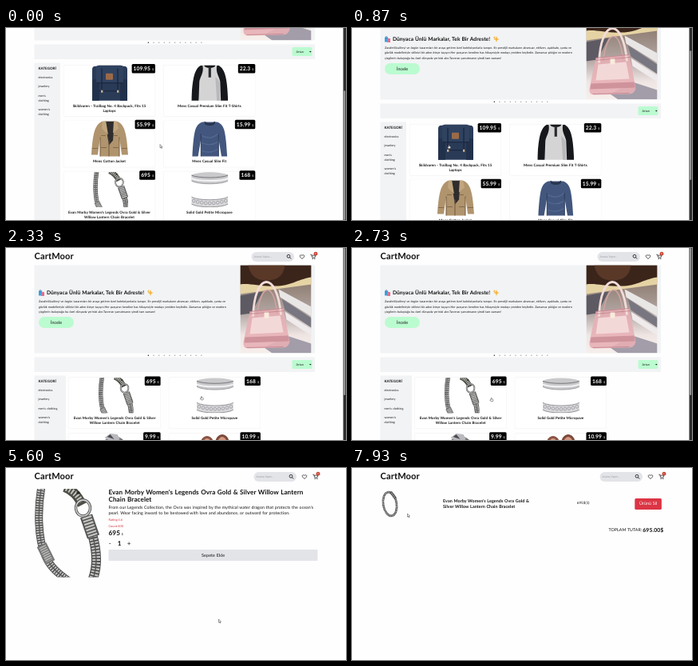
Write an HTML page with a canvas that moves like this. It is 426 px wide and 240 px high and loops after 8000 ms.

```html
<!DOCTYPE html>
<html lang="tr">
<head>
<meta charset="utf-8">
<title>CartMoor</title>
<style>
html, body { margin: 0; width: 100%; height: 100%; overflow: hidden; background: #fefefe; }
canvas { display: block; width: 100vw; height: 100vh; }
</style>
</head>
<body>
<canvas id="stage"></canvas>
<script>
const W = 426, H = 240, LOOP = 8000, STEP = 1000 / 15;
const canvas = document.getElementById('stage');
const ctx = canvas.getContext('2d');
const INK = '#111', PANEL = '#f2f3f5', MINT = '#bbfbd0', GREY = '#e3e4e8';

// Times of the clicks and page loads, in ms.
const PICK = 1460, LISTED = 1900, OPEN = 3030, OPENED = 3190, PLUS = 4800, ADD = 6600, CART = 7100;

const SHOP = 'CartMoor';
const BRACELET = "Evan Morby Women's Legends Ovra Gold &";

// ---------- helpers ----------
function rect(x, y, w, h, fill, r = 0) {
  ctx.fillStyle = fill;
  ctx.beginPath();
  ctx.roundRect(x, y, w, h, r);
  ctx.fill();
}

function setFont(size, bold) {
  ctx.font = `${bold ? 700 : 400} ${size}px Lato, "Open Sans", sans-serif`;
  ctx.textRendering = 'geometricPrecision';
  ctx.letterSpacing = `${size * 0.01}px`;
  ctx.wordSpacing = `${size * 0.05}px`;
}

function text(str, x, y, size, { bold = false, color = INK, align = 'left' } = {}) {
  setFont(size, bold);
  ctx.textAlign = align;
  ctx.fillStyle = color;
  ctx.fillText(str, x, y);
}

function poly(fill, ...p) {
  ctx.fillStyle = fill;
  ctx.beginPath();
  for (let i = 0; i < p.length; i += 2) ctx.lineTo(p[i], p[i + 1]);
  ctx.closePath();
  ctx.fill();
}

function blob(d, fill) {
  ctx.fillStyle = fill;
  ctx.fill(new Path2D(d));
}

function line(d, color, width, dash = []) {
  ctx.strokeStyle = color;
  ctx.lineWidth = width;
  ctx.setLineDash(dash);
  ctx.stroke(new Path2D(d));
  ctx.setLineDash([]);
}

function oval(x, y, rx, ry, color, width) {
  ctx.beginPath();
  ctx.ellipse(x, y, rx, ry, 0, 0, Math.PI * 2);
  if (width) {
    ctx.strokeStyle = color;
    ctx.lineWidth = width;
    ctx.stroke();
  } else {
    ctx.fillStyle = color;
    ctx.fill();
  }
}

// Draws inside a clipped box with local coordinates.
function inBox(x, y, w, h, draw) {
  ctx.save();
  ctx.beginPath();
  ctx.rect(x, y, w, h);
  ctx.clip();
  ctx.translate(x, y);
  draw();
  ctx.restore();
}

// ---------- pictures ----------
function bagPhoto() {
  const g = ctx.createLinearGradient(0, 20, 0, 110);
  g.addColorStop(0, '#8d7c70');
  g.addColorStop(0.45, '#b3a7a4');
  g.addColorStop(0.75, '#efe6e4');
  g.addColorStop(1, '#f6efeb');
  rect(0, 0, 89, 110, g);
  poly('#e6d3a4', 0, 22, 89, 14, 89, 24, 0, 36);
  blob('M0 0 H89 V15 C70 18 64 26 44 26 C24 27 12 22 0 24 Z', '#3b251b');
  blob('M10 0 H56 C54 14 46 19 32 19 C18 19 12 10 10 0 Z', '#5a3828');
  poly('#5d5a63', 0, 38, 28, 33, 14, 60, 0, 62);
  poly('#e9e6e6', 48, 30, 89, 52, 89, 64, 50, 40);
  poly('#787680', 52, 42, 89, 66, 89, 78, 56, 56);
  poly('#efebec', 56, 58, 89, 80, 89, 88, 58, 68);
  poly('#a29da9', 58, 88, 89, 98, 89, 110, 40, 110, 30, 103);
  blob('M12 58 L54 54 L62 96 Q60 103 54 103 L10 104 Q3 104 4 96 Z', 'rgba(232,176,182,0.88)');
  poly('#f3d8d8', 15, 66, 50, 63, 54, 84, 12, 86);
  poly('#cf939c', 6, 90, 60, 88, 61, 95, 5, 97);
  line('M16 64 C18 8 46 6 51 62', '#f2dcd9', 2.8);
  line('M21 62 C26 22 42 20 46 60', '#d5a3a6', 1.4);
  line('M12 58 L54 54 M11 61 L55 57 M8 103 L54 102', '#c98b93', 1);
  rect(30, 59, 6, 7, '#f8ecdc', 1);
}

function backpack() {
  rect(9, -3, 28, 10, '#1d2a40', 3);
  rect(1, 1, 44, 46, '#2a3b58', 4);
  poly('#22314b', 1, 18, 10, 16, 10, 46, 1, 46);
  poly('#22314b', 45, 18, 36, 16, 36, 46, 45, 46);
  rect(6, 0, 34, 22, '#2f4260', 3);
  line('M7 22 H39 M10 32 H36', '#182338', 1.1);
  line('M13 4 V32 M33 4 V32', '#1a263d', 1.3);
  rect(18, 10, 9, 8, '#9a6a48', 1);
  rect(12, 31, 2.4, 3, '#c9b08a');
  rect(32, 31, 2.4, 3, '#c9b08a');
}

function raglan() {
  blob('M12 0 C4 4 1 16 0 46 H9 L14 16 H32 L37 46 H46 C45 18 43 5 34 0 Z', '#17181b');
  blob('M14 0 C16 9 11 14 10 20 L9 46 H37 L36 20 C35 14 30 9 32 0 Z', '#d4d4d5');
  poly('#b9b9bc', 30, 14, 35, 20, 36, 46, 32, 46);
  oval(23, 0, 7, 3, '#17181b');
  rect(21.4, 2, 3.2, 13, '#2a2b2f');
}

function slimShirt() {
  blob('M14 1 C5 4 3 10 1 46 H8 L12 22 V46 H34 V22 L38 46 H45 C43 10 41 4 32 1 Z', '#43577e');
  blob('M16 0 Q23 5 30 0 L29 4 Q23 7 17 4 Z', '#28344f');
  line('M12 16 L12 46 M34 16 L34 46', '#2c3c5d', 1);
  line('M13 18 Q24 24 33 16 M13 27 Q24 32 33 26 M13 37 Q24 41 33 35', '#546a93', 1.1);
}

function jacket() {
  blob('M14 0 C5 4 2 12 0 42 H8 L11 20 V46 H35 V20 L38 42 H46 C44 12 41 4 32 0 Z', '#b0946e');
  poly('#2f2d2d', 17, 0, 29, 0, 27, 24, 22, 30);
  poly('#c2a67f', 14, 0, 18, -1, 21, 17, 13, 9);
  poly('#c2a67f', 32, 0, 28, -1, 27, 15, 34, 9);
  line('M22 24 V46 M11 20 V46 M35 20 V46', '#72593e', 1);
  line('M12 33 H19 M27 33 H34 M12 18 H18 M28 18 H33 M1 34 H8 M38 34 H45', '#83694a', 1.2);
}

function braid(d, w) {
  line(d, '#4b4b4b', w);
  line(d, '#c6c6c4', w * 0.82, [w * 0.17, w * 0.14]);
  line(d, '#555', w * 0.12);
}

function bracelet() {
  braid('M9 -3 C4 25 4 62 14 84', 10);
  braid('M14 84 C20 98 30 106 44 116', 10);
  line('M9 70 L20 92', '#777', 13);
  line('M10 72 L19 90', '#bdbdbb', 9, [1.5, 1.3]);
  line('M38 -2 C48 2 54 8 60 20', '#4d4f47', 12);
  line('M40 -1 C50 4 55 9 59 17', '#c2c2bd', 7, [2, 2]);
  oval(55, 5, 2.2, 1.8, '#272b25');
  oval(61, 24, 9, 10, '#5a5a5a', 3.4);
  oval(61, 24, 9, 10, '#d2d2d0', 1.5);
  braid('M72 55 C79 78 80 98 72 116', 12);
  line('M65 34 L74 60', '#565656', 16);
  line('M65.5 35 L73.5 59', '#c5c5c2', 12, [2.2, 1.6]);
}

function braceletSmall() {
  ctx.save();
  ctx.translate(12, 18);
  ctx.rotate(-0.16);
  oval(0, 0, 8.4, 15, '#4b4b4b', 2.6);
  ctx.setLineDash([0.8, 0.7]);
  oval(0, 0, 8.4, 15, '#b5b5b3', 1.8);
  ctx.setLineDash([]);
  ctx.restore();
  line('M13 3 L19 11', '#555', 3.4);
  line('M14 4 L18 10', '#aaa', 1.6, [1, 1]);
}

function band() {
  blob('M0 4 C8 -1 38 -1 46 4 V11 C38 16 8 16 0 11 Z', '#c9c9cc');
  line('M0 4 C8 8 38 8 46 4', '#77777b', 1);
  line('M0 8 C8 12 38 12 46 8', '#f4f4f6', 2);
  line('M0 11 C8 16 38 16 46 11', '#8e8e92', 0.8);
  blob('M0 31 C8 36 38 36 46 31 V40 C38 45 8 45 0 40 Z', '#d9d9dc');
  line('M0 31 C8 36 38 36 46 31 M0 40 C8 45 38 45 46 40', '#7f7f84', 0.8);
  for (let i = 0; i < 9; i++) {
    const u = (i - 4) / 4;
    oval(23 + u * 20, 39 - u * u * 3, 1.8, 2, '#99999e', 0.8);
  }
}

function gemRing() {
  oval(22, 24, 17, 19, '#77777a', 3);
  poly('#b9b9be', 10, 5, 17, 0, 26, 1, 29, 7, 20, 12);
  poly('#4a4a4e', 13, 4, 17, 1, 22, 7);
}

function plugs() {
  oval(13, 15, 9, 12, '#8a5444');
  oval(13, 15, 6, 9, '#d9a08a');
  oval(32, 13, 9, 12, '#7d4a3b');
  oval(32, 13, 6, 9, '#d29a84');
}

// ---------- page parts ----------
function header(dx, count) {
  text(SHOP, 35.5, 14, 11.1, { bold: true });
  rect(310.5 + dx, 5, 53.5, 12, GREY, 6);
  text('Arama Yapın...', 313.5 + dx, 12.2, 3.5, { color: '#9a9ca3' });
  oval(357 + dx, 10.3, 1.9, 1.9, INK, 0.8);
  ctx.save();
  ctx.translate(dx, 0);
  line('M358.4 11.7 L360.2 13.5', INK, 0.9);
  line('M374 13.4 C369.4 10.6 371.4 7.4 374 9.4 C376.6 7.4 378.6 10.6 374 13.4 Z', INK, 0.7);
  line('M384.3 8.2 H385.6 L386.8 12 H390 L390.8 9.2 H386', INK, 0.7);
  ctx.restore();
  oval(387.2 + dx, 13.4, 0.6, 0.6, INK);
  oval(389.8 + dx, 13.4, 0.6, 0.6, INK);
  oval(391 + dx, 7.2, 2.4, 2.4, '#c8402f');
  text(count, 391 + dx, 8.3, 3, { color: '#fff', align: 'center' });
}

function banner(dx) {
  rect(35.5, 21.5, 354.5 + dx, 110, PANEL);
  inBox(293.5, 21.5, 89, 109.7, bagPhoto);
  rect(41, 53.5, 4.2, 6, '#3aa0e0', 0.6);
  rect(44, 55, 4, 5, '#e2708c', 0.6);
  oval(43, 53.5, 1, 1.2, '#2b6fa5', 0.5);
  text('Dünyaca Ünlü Markalar, Tek Bir Adreste!', 51, 58.4, 6.6, { bold: true });
  poly('#f5b63f', 181, 52, 182, 55, 184.6, 56, 182, 57, 181, 60, 180, 57, 177.4, 56, 180, 55);
  poly('#f5b63f', 178.4, 52, 179, 53.4, 180, 54, 179, 54.6, 178.4, 56, 177.8, 54.6, 176.8, 54, 177.8, 53.4);
  [
    'Zarafetli,kaliteyi ve özgün tasarımları bir araya getiren özel koleksiyonlarla tanışın. En prestijli markaların aksesuar, eldiven, ayakkabı, çanta ve',
    'gözlük modelleriyle stilinizi bir adım öteye taşıyın.Her parçanın kendine has hikayesiyle modayı yeniden keşfedin. Zamansız şıklığın ve modern',
    'çizgilerin buluştuğu bu özel dünyada yerinizi alın.Tarzınızı yansıtmanın şimdi tam zamanı!'
  ].forEach((s, i) => text(s, 41, 68.2 + i * 6.3, 3.7));
  rect(41, 86, 44, 14, MINT, 7);
  text('İncele', 63, 95, 5.4, { align: 'center' });
  for (let i = 0; i < 11; i++)
    oval(180 + dx * 0.55 + i * 6.65, 134.2, 0.8, 0.8, i ? '#aaa' : '#333');
  rect(35.5, 136.5, 354.5 + dx, 18.5, PANEL);
  rect(361.5 + dx, 140, 25, 11, MINT, 1.5);
  text('Artan', 366.5 + dx, 147, 3.7);
  poly(INK, 383 + dx, 145, 385.6 + dx, 145, 384.3 + dx, 146.6);
}

function categories(width, height, names) {
  rect(35.5, 159.5, width, height, PANEL);
  text('KATEGORİ', 40.5, 168, 4.45, { bold: true });
  let y = 178.6;
  for (const name of names) {
    name.split('|').forEach((s, i) => text(s, 40.5, y + i * 6.1, 3.7));
    y += name.includes('|') ? 17.5 : 11.5;
  }
}

function card(x, y, h, { title, price, draw }) {
  rect(x, y, 115, h, '#f0f0f2', 1.5);
  rect(x + 0.4, y + 0.4, 114.2, h - 0.8, '#fff', 1.5);
  inBox(x + 35, y + 0.8, 46, 44, draw);
  title.split('|').forEach((s, i) =>
    text(s, x + 57.5, y + 52.6 + i * 6.1, 4.5, { bold: true, align: 'center' }));
  setFont(6.7, true);
  const w = ctx.measureText(price).width + 8;
  rect(x + 115 - w, y - 1, w, 11.6, '#000', 1.5);
  text(price, x + 117 - w, y + 7, 6.7, { bold: true, color: '#fff' });
  text('$', x + 111, y + 7, 3.6, { color: '#fff' });
}

const braceletCard = {
  title: BRACELET + ' Silver|Willow Lantern Chain Bracelet', price: '695',
  draw() { ctx.translate(2, 0); ctx.scale(0.54, 0.54); bracelet(); }
};
const bandCard = { title: 'Solid Gold Petite Micropave', price: '168', draw: band };
const allRows = [
  [162, { title: 'Skildvaren - Trailbag No. 4 Backpack, Fits 15|Laptops', price: '109.95', draw: backpack },
    { title: 'Mens Casual Premium Slim Fit T-Shirts', price: '22.3', draw: raglan }],
  [231.7, { title: 'Mens Cotton Jacket', price: '55.99', draw: jacket },
    { title: 'Mens Casual Slim Fit', price: '15.99', draw: slimShirt }],
  [295.2, braceletCard, bandCard]
];
const jewelRows = [
  [161.5, braceletCard, bandCard],
  [231.3, { title: 'White Gold Plated Princess', price: '9.99', draw: gemRing },
    { title: 'Pierced Owl Rose Gold Plated|Double', price: '10.99', draw: plugs }]
];

function grid(rows, x) {
  for (const [y, a, b] of rows) {
    const h = (a.title + b.title).includes('|') ? 64.5 : 58.5;
    card(x, y, h, a);
    card(x + 125.3, y, h, b);
  }
}

function scrollbar(scroll, total) {
  rect(422.5, 0, 3.5, H, '#2c2c2c');
  rect(423.2, H * scroll / total, 2, H * H / total, '#9f9f9f', 1);
}

// ---------- pages ----------
function homePage(scroll) {
  ctx.save();
  ctx.translate(0, -scroll);
  header(-3, 0);
  banner(-3);
  categories(32.5, 200, ['electronics', 'jewelery', "men's|clothing", "women's|clothing"]);
  grid(allRows, 72);
  ctx.restore();
  scrollbar(scroll, 356);
}

function loadingPage() {
  header(0, 0);
  banner(0);
  categories(59.5, 60.5, ['electronics', 'jewelery', "men's clothing", "women's clothing"]);
  text('Loading.', 95, 163.6, 3.7);
}

function jewelPage() {
  header(-3, 0);
  banner(-3);
  categories(39.5, 150, ['electronics', 'jewelery', "men's clothing", "women's|clothing"]);
  grid(jewelRows, 78.6);
  scrollbar(0, 313);
}

function productPage(count, inCart) {
  header(0, inCart);
  inBox(35.5, 26, 84, 110.5, bracelet);
  text(BRACELET + ' Silver Willow Lantern', 128.5, 32.6, 8.1, { bold: true });
  text('Chain Bracelet', 128.5, 41.6, 8.1, { bold: true });
  text("From our Legends Collection, the Ovra was inspired by the mythical water dragon that protects the ocean's", 128.5, 50.6, 5.3);
  text('pearl. Wear facing inward to be bestowed with love and abundance, or outward for protection.', 128.5, 57.6, 5.3);
  text('Rating:4.6', 128.5, 65.8, 3.9, { color: '#d8343f' });
  text('Count:400', 128.5, 73.6, 3.9, { color: '#d8343f' });
  text('695', 128.5, 84.2, 8.2, { bold: true });
  text('$', 144.8, 84.2, 3.6);
  text('-', 130.2, 96.6, 8, { align: 'center' });
  text(count, 142, 96.9, 8, { bold: true, align: 'center' });
  text('+', 154, 96.6, 8, { align: 'center' });
  rect(128.5, 102, 262, 14, GREY, 1);
  text('Sepete Ekle', 259.6, 110.9, 5.5, { align: 'center' });
}

function cartPage() {
  header(0, 1);
  inBox(35.5, 27, 25, 36, braceletSmall);
  text(BRACELET, 114, 43.2, 5.4, { bold: true });
  text('Silver Willow Lantern Chain Bracelet', 114, 50.3, 5.4, { bold: true });
  text('695$(1)', 281.8, 45.2, 4.5);
  rect(354.3, 38, 33.6, 14, '#dc3545', 1.5);
  text('Ürünü Sil', 371.2, 46.2, 5.4, { color: '#fff', align: 'center' });
  text('TOPLAM TUTAR:', 321.5, 79.2, 5.3);
  text('695.00$', 390.4, 79.5, 6.9, { bold: true, align: 'right' });
}

// ---------- pointer ----------
const track = [
  [0, 193, 145.5], [400, 193, 145.5], [1330, 50.5, 147], [1530, 50.5, 147],
  [2270, 245, 185.5], [2400, 245, 185.5], [2900, 150, 188], [3060, 150, 188],
  [3390, 223, 196], [3460, 223, 196], [4000, 176, 146], [4700, 154, 93],
  [4950, 154, 93], [5560, 266.5, 189], [5860, 266.5, 189], [6400, 262, 108],
  [6690, 262, 108], [7060, 387.5, 11], [7260, 387.5, 11], [7920, 69.5, 57], [8000, 69.5, 57]
];
const smooth = u => u * u * (3 - 2 * u);
const between = (t, a, b) => smooth(Math.min(1, Math.max(0, (t - a) / (b - a))));

function pointerAt(t) {
  const i = track.findIndex(k => k[0] > t);
  const [t0, x0, y0] = track[i - 1], [t1, x1, y1] = track[i];
  const u = between(t, t0, t1);
  return [x0 + (x1 - x0) * u, y0 + (y1 - y0) * u];
}

function isLink(t, x, y) {
  const inColumn = left => x > left && x < left + 115;
  const near = (cx, cy) => Math.hypot(x - cx, y - cy) < 5;
  if (t < PICK) return x < 66 || inColumn(72);
  if (t < LISTED) return false;
  if (t < OPEN) return y > 160 && (inColumn(78.6) || inColumn(203.9));
  if (t < OPENED) return false;
  if (t < CART) return (y > 102 && y < 116 && x > 128) || near(154, 94) || near(387, 11);
  return near(387, 11);
}

function pointer(t) {
  const [x, y] = pointerAt(t);
  ctx.save();
  ctx.translate(x, y);
  const shape = new Path2D(isLink(t, x, y)
    ? 'M-.5 .3 Q0 -.3 .5 .3 V1.6 L2 2 Q2.5 2.2 2.3 2.8 L1.8 4.4 H-.5 L-1.9 2.7 Q-1.7 2 -.5 2.7 Z'
    : 'M0 0 V4.2 L1 3.4 L1.7 5 L2.4 4.7 L1.7 3.1 H3 Z');
  ctx.fillStyle = '#fff';
  ctx.fill(shape);
  ctx.strokeStyle = '#222';
  ctx.lineWidth = 0.45;
  ctx.stroke(shape);
  ctx.restore();
}

// ---------- loop ----------
function draw(t) {
  rect(0, 0, W, H, '#fefefe');
  if (t < PICK) homePage(116 - 74 * between(t, 10, 870));
  else if (t < LISTED) loadingPage();
  else if (t < OPEN) jewelPage();
  else if (t < OPENED) header(0, 0);
  else if (t < CART) productPage(t < PLUS ? 0 : 1, t < ADD ? 0 : 1);
  else cartPage();
  pointer(t);
}

function frame(now) {
  const dpr = window.devicePixelRatio || 1;
  const w = Math.round(innerWidth * dpr), h = Math.round(innerHeight * dpr);
  if (canvas.width !== w || canvas.height !== h) {
    canvas.width = w;
    canvas.height = h;
  }
  ctx.setTransform(w / W, 0, 0, h / H, 0, 0);
  draw(Math.floor(((now + 4) % LOOP) / STEP) * STEP);
  requestAnimationFrame(frame);
}
requestAnimationFrame(frame);
</script>
</body>
</html>
```
